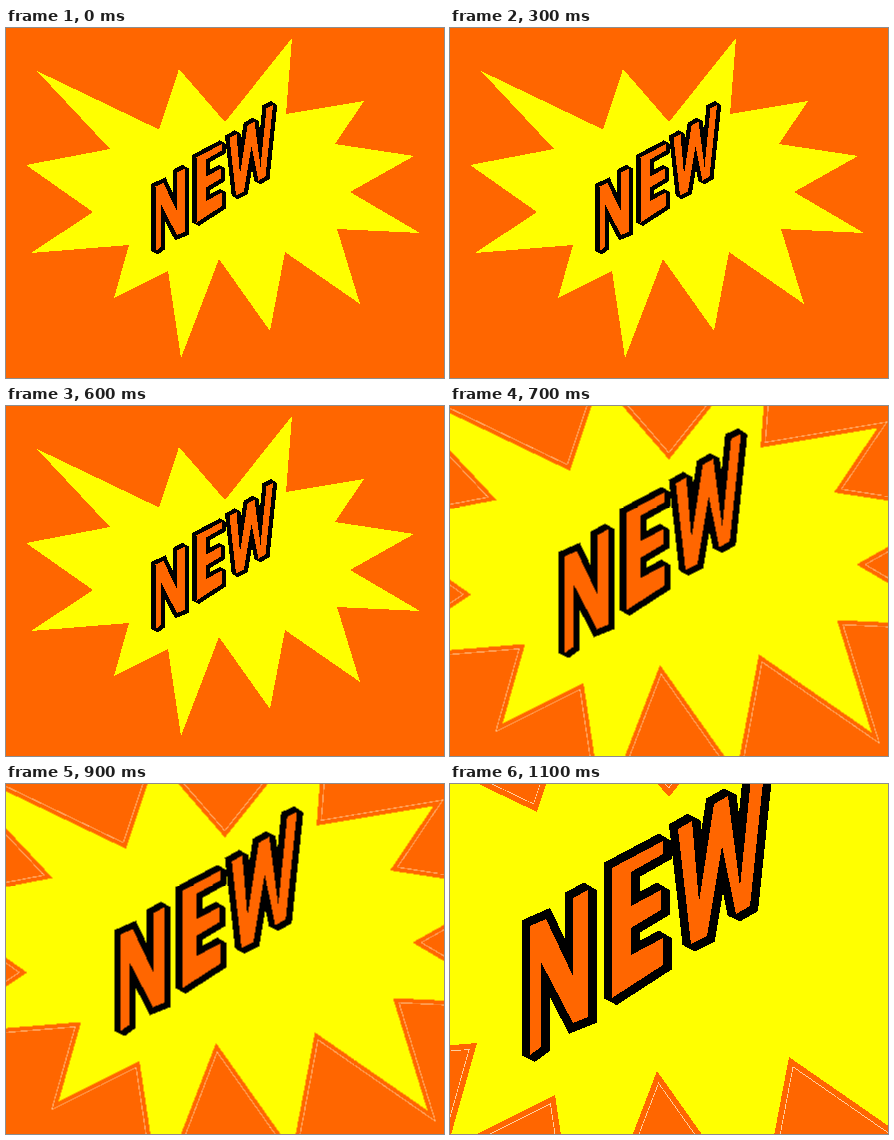
Recreate the animation shown at these times as an HTML page. Size 438 by 350 pixels, loop 1200 ms.

```html
<!DOCTYPE html>
<html lang="en">
<head>
<meta charset="utf-8">
<title>NEW</title>
<style>
  html, body { margin: 0; width: 100%; height: 100%; overflow: hidden; background: #f60; }
  svg { display: block; width: 438px; height: 350px; }
  .zoom { transform-origin: 219px 175px; animation: zoom 1.2s step-end infinite; }
  .burst { stroke-linejoin: miter; stroke-miterlimit: 20; }
  .rim { stroke: #ffd0a0; stroke-width: 6.2; animation: rim 1.2s step-end infinite; }
  .gap { stroke: #f60; stroke-width: 5.4; }
  .word { fill: #f60; stroke: #000; stroke-width: 17; stroke-linejoin: miter; stroke-miterlimit: 1.7; paint-order: stroke; }
  @keyframes zoom {
    0% { transform: scale(1); }
    58.333% { transform: scale(1.5); }
    83.333%, 100% { transform: scale(2); }
  }
  @keyframes rim {
    0% { opacity: 0; }
    58.333%, 100% { opacity: 1; }
  }
</style>
</head>
<body>
<svg viewBox="0 0 438 350" role="img" aria-label="NEW" shape-rendering="crispEdges">
  <defs>
    <path id="star" d="M31 43L153 101.500 173 41 219 94 286 10 280 86 358 73 329 116 408 128 344 164 414 205 331 201 354 276 279 224 264 303 213 231 175 330 162 243 108 270 123 217 25 225 87 184 20 137 104 121Z"/>
  </defs>
  <rect width="438" height="350" fill="#f60"/>
  <g class="zoom">
    <g class="burst">
      <use href="#star" class="rim"/>
      <use href="#star" class="gap"/>
      <use href="#star" fill="#ff0"/>
    </g>
    <!-- letters are drawn at double size around the stage centre -->
    <g class="word" transform="translate(109.5 87.5) scale(.5)">
      <path d="M80 142L96 135 123 192V114L138 106V233L123 239 91 178V263L80 271Z"/>
      <path d="M162 84L213 57V70L181 88V122L211 106V126L181 144V171L213 154V181L162 214Z"/>
      <path d="M228 45L242 37 249 118 264 20 278 12 290 103 302 -15 315 -21 300 122 286 130 272 62 257 152 241 160Z"/>
    </g>
  </g>
</svg>
</body>
</html>
```
